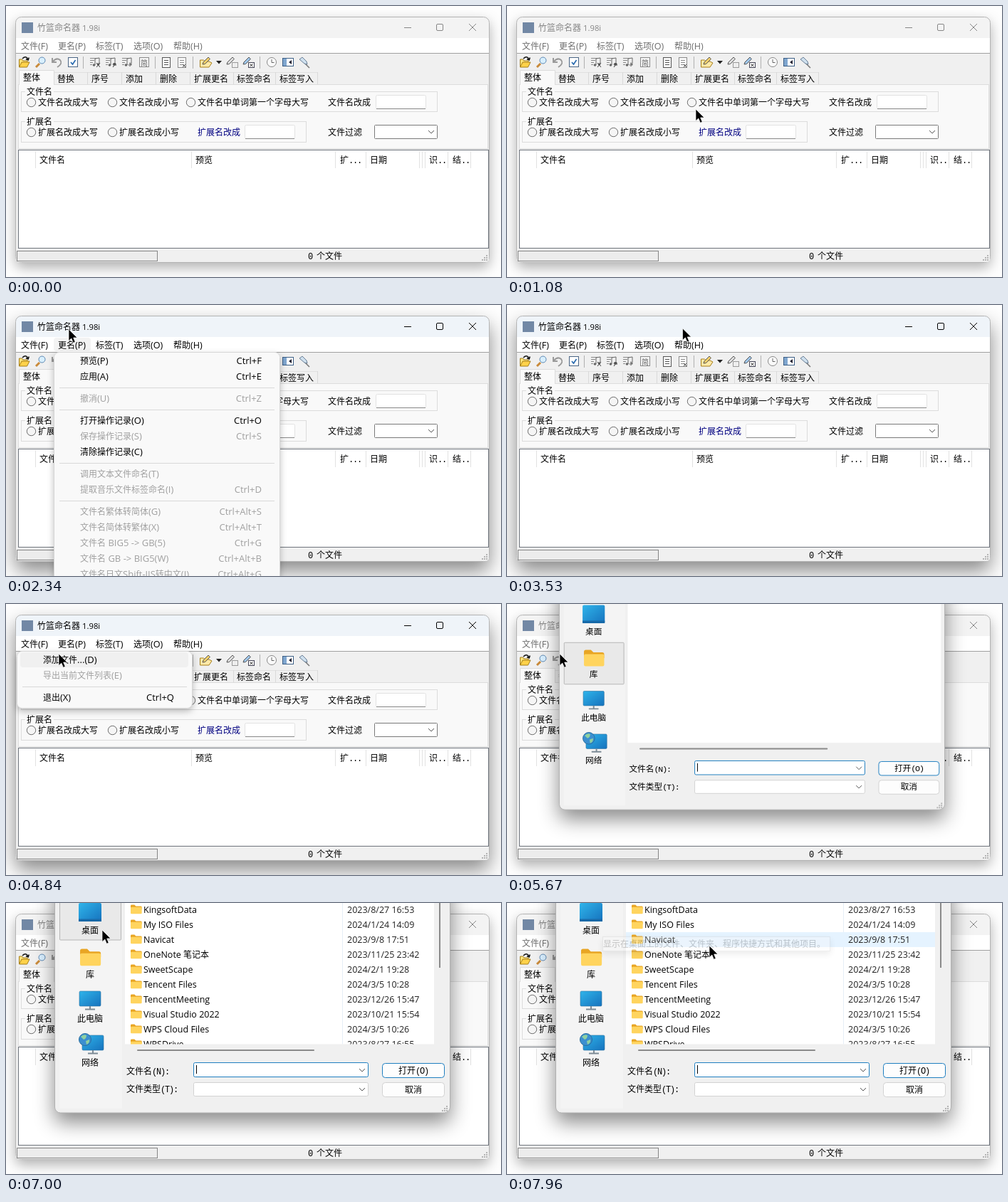
Recreate the animation shown at these times as an HTML page. Size 695 by 381 pixels, loop 8000 ms.

```html
<!DOCTYPE html>
<html lang="zh-CN">
<head>
<meta charset="utf-8">
<style>
html, body { margin: 0; width: 100%; height: 100%; overflow: hidden; background: #fefefe; }
svg { display: block; width: 100%; height: 100%; --ink: #868686; --menu: #6e6e6e; --bar: #f3f3f3; }
svg.active { --ink: #000; --bar: #eff4f9; }
svg.awake { --menu: #000; }
text { font: 12px "Open Sans", "Noto Sans CJK SC", "Noto Sans CJK", sans-serif; white-space: pre; }
.m { font-family: "Liberation Mono", "Noto Sans CJK SC", "Noto Sans CJK", monospace; }
.m tspan { letter-spacing: -1.2px; }
.frame { filter: drop-shadow(0 7px 9px rgba(0,0,0,.3)); }
.active .frame, #dialog .shell { filter: drop-shadow(0 13px 14px rgba(0,0,0,.46)); }
.pop { filter: drop-shadow(0 4px 5px rgba(0,0,0,.25)); }
</style>
</head>
<body>
<svg id="stage" viewBox="0 0 695 381" preserveAspectRatio="none"></svg>
<script>
const LOOP = 8000;
const stage = document.getElementById('stage');
const $ = id => document.getElementById(id);

// Drawing helpers: text is centred on y, Latin runs get their own size
const T = (x, y, s, o = '', latin = 12.6) =>
  `<text x="${x}" y="${y + 4.5}" ${o}>` +
  s.replace(/[ -~]+/g, m => `<tspan font-size="${latin}">${m}</tspan>`) + '</text>';
const M = (x, y, s, o = '') => T(x, y, s, 'class="m" ' + o, 12);
const R = (x, y, w, h, fill, o = '') =>
  `<rect x="${x}" y="${y}" width="${w}" height="${h}" fill="${fill}" ${o}></rect>`;
const B = (x, y, w, h, fill, line, r = 0, o = '') =>
  R(x + .5, y + .5, w - 1, h - 1, fill, `stroke="${line}" rx="${r}" ${o}`);
const P = (d, line, fill = 'none', o = '') => `<path d="${d}" stroke="${line}" fill="${fill}" ${o}></path>`;
const C = (x, y, r, fill, line = 'none') => `<circle cx="${x}" cy="${y}" r="${r}" fill="${fill}" stroke="${line}"></circle>`;
const G = (id, s) => `<g id="${id}">${s}</g>`;
const V = (xs, y, h, c) => xs.map(x => R(x, y, 1, h, c)).join('');
const each = (list, f) => list.map(f).join('');
const chevron = (x, y) => P(`M${x - 4} ${y - 2}l4 4 4 -4`, '#555');
const grip = (x, y) => each([[0, 0], [-3, 0], [-6, 0], [0, -3], [-3, -3], [0, -6]],
  ([a, b]) => R(x + a, y + b, 2, 2, '#b4b4b4'));
const folder = (x, y, k) => `<g transform="translate(${x} ${y}) scale(${k})">` +
  P('M0 1.5q0 -1.5 1.5 -1.5h4l2 2h7q1.5 0 1.5 1.5v3h-16z', 'none', '#e8a524') +
  R(0, 3.4, 16, 9.6, '#ffd45e', 'rx="1.2"') + '</g>';
const monitor = (x, y) => R(x, y, 30, 21, 'url(#blue)', 'rx="1.5" stroke="#2b6f9e" stroke-width=".6"') +
  P(`M${x + 15} ${y + 21}v4M${x + 8} ${y + 25.5}h14`, '#7d8b96', 'none', 'stroke-width="2"');

function toolbar() {
  const dim = '#9a9a9a';
  const sheet = (x, c) => B(x - 6, 72, 12, 15, '#fafafa', c) +
    P(`M${x - 3} 76.5h6m-6 3h6m-6 3h6`, c);
  const notes = x => P(`M${x - 7} 73.5h9m-9 3h6m-6 3h4m-4 3h3`, '#888') +
    P(`M${x} 83v-9l6 -1v8`, '#666') + C(x - 1.5, 83, 1.8, '#666') + C(x + 4.5, 82, 1.8, '#666');
  const pencil = (x, c) => P(`M${x - 5} 82l1 -3 7 -7 2.5 2.5 -7 7z`, '#555', c);
  return V([108, 209, 262, 356], 71, 17, '#b0b0b0') +
    P('M18.5 86v-11h4l1.5 2h6v3', '#a57e18', '#ffe37a') + P('M18.5 86l3.5 -7h11l-3.5 7z', '#a57e18', '#ffd24a') +
    P('M23 74q5 -5 8 1m-3 -.5l3.2 1.5 1 -3.5', '#111', 'none', 'stroke-width="1.5"') +
    P('M47 81l-5 5', '#c98a3a', 'none', 'stroke-width="3"') + C(50.5, 76.5, 4.5, '#d8efff', '#5b86b0') +
    P('M65 73v6h6M66 78q5 -6 10 -2q4 5 -4 10', dim, 'none', 'stroke-width="2"') +
    B(87, 72, 14, 14, '#fff', '#4a6584') + P('M91 79l2.5 3 4 -6', '#2b6cb0', 'none', 'stroke-width="1.7"') +
    each([125, 147, 170], notes) +
    P('M127 80l5 6m0 -6l-5 6', '#444') + P('M150 86l4 -5m-3 0h3v3', '#333') + P('M174 79v6m-3 -3l3 3 3 -3', dim) +
    B(187, 72, 14, 14, '#f4f4f4', '#8a8a8a') + T(189, 79, '简', 'style="font-size:10px" fill="#666"') +
    sheet(225, '#555') + sheet(247, '#8a8a8a') + P('M248 86l4 -4m0 4l-4 -4', '#555') +
    P('M272.5 86v-10h5l1.5 2h6l4 2 -4 6z', '#a57e18', '#ffe9a8') + pencil(281, '#f5cf6a') +
    P('M295 77h8l-4 4.5z', 'none', '#222') +
    pencil(315, '#ddd') + B(317, 79, 9, 8, '#eee', dim) + pencil(338, '#9fc6ec') +
    B(340, 79, 9, 8, '#fff', '#445') + P('M342.5 81.5l4 3.5m0 -3.5l-4 3.5', '#222') +
    C(373, 79, 6.5, '#fafafa', '#888') + P('M373 75v4.5h3.5', '#666') +
    B(388, 73, 16, 12, '#fff', '#3d5f86') + R(389, 74, 5, 10, '#7fa6cf') + P('M401 76v6l-4 -3z', 'none', '#223') +
    P('M419 80l7 7', '#777', 'none', 'stroke-width="1.5"') + P('M412 75l4 -3 6 6 1 4 -4 -1z', '#6a7f96', '#cfe0ee');
}

function mainWindow() {
  const radio = (x, y, s) => C(x, y, 6.2, '#f5f5f5', '#6c6c6c') + M(x + 9.5, y, s);
  const input = (x, y) => B(x, y, 71, 20, '#fff', '#e2e2e2', 2) + R(x + 1, y + 19, 69, 1, '#8a8a8a');
  const group = (y, w, h, s) => B(21, y, w, h, 'none', '#dcdcdc') + R(27, y - 4, 40, 9, '#f9f9f9') + M(29, y + .7, s);
  const ink = 'fill="var(--ink)"', menuInk = 'fill="var(--menu)"';
  return R(13.5, 15.5, 665, 345, 'var(--bar)', 'rx="8" stroke="#b4b4b4" class="frame"') +
    R(22, 23, 16, 15, '#7288a5') + T(44, 30, '竹篮命名器 1.98i', ink, 11.3) +
    P('M559 30.5h10M606 25.5h6q1.5 0 1.5 1.5v6q0 1.5 -1.5 1.5h-6q-1.5 0 -1.5 -1.5v-6q0 -1.5 1.5 -1.5M650 25l10 10m0 -10l-10 10', 'var(--ink)') +
    R(14, 45, 664, 21, '#fff') + G('spot', R(67, 46, 52, 19, '#f3f3f3', 'rx="4"')) +
    each([[21, '文件(F)'], [73, '更名(P)'], [126, '标签(T)'], [179, '选项(O)'], [235, '帮助(H)']],
      ([x, s]) => T(x, 56, s, menuInk)) +
    R(14, 66, 664, 287, '#f0f0f0') + R(14, 352, 664, 8, '#f0f0f0', 'rx="5"') + R(14, 66, 664, 1, '#a0a0a0') +
    toolbar() +
    B(17, 110, 660, 91, '#f9f9f9', '#dcdcdc') + R(67, 93, 371, 1, '#e0e0e0') +
    V([114, 162, 210, 258, 319, 378, 437], 93, 17, '#d9d9d9') +
    P('M18.5 111v-20.5h49v20.5', '#dcdcdc', '#f9f9f9') + M(24, 100, '整体') +
    each([[72, '替换'], [120, '序号'], [168, '添加'], [216, '删除'], [264, '扩展更名'], [324, '标签命名'], [384, '标签写入']],
      ([x, s]) => M(x, 102, s)) +
    group(120, 585, 29, '文件名') + group(162, 401, 30, '扩展名') +
    radio(35.5, 135.5, '文件名改成大写') + radio(149.5, 135.5, '文件名改成小写') +
    radio(259.5, 135.5, '文件名中单词第一个字母大写') +
    radio(35.5, 177.5, '扩展名改成大写') + radio(149.5, 177.5, '扩展名改成小写') +
    M(452, 135, '文件名改成') + input(519, 125) +
    M(269, 177, '扩展名改成', 'fill="#000080"') + input(335, 167) +
    M(452, 177, '文件过滤') + B(517, 167, 89, 20, '#fff', '#7a7a7a', 1) + chevron(597, 177) +
    B(17, 202, 661, 139, '#fff', '#6e747c') + V([41, 260, 462, 505, 580, 584, 588, 620, 652], 204, 24, '#e2e2e2') +
    each([[47, '文件名'], [266, '预览'], [469, '扩...'], [511, '日期'], [594, '识..'], [627, '结..']],
      ([x, s]) => M(x, 216, s)) +
    B(15, 344, 198, 15, '#ececec', '#858585') + M(424, 351, '0 个文件') + grip(674, 356);
}

// Items are [label, shortcut, disabled]; null is a separator
function menu(id, x, w, h, tx, right, items, under = '') {
  let y = 78, s = R(x + .5, 66.5, w, h, '#f9f9f9', 'rx="7" stroke="#d6d6d6" class="pop"') + under;
  for (const it of items) {
    if (!it) { s += R(x + 8, y - 6, w - 15, 1, '#d9d9d9'); y += 9; continue; }
    const fill = `fill="${it[2] ? '#a0a0a0' : '#000'}"`;
    s += T(tx, y, it[0], fill, 13) + T(right, y, it[1], fill + ' text-anchor="end"', 13);
    y += 22;
  }
  return G(id, s);
}

const files = [['KingsoftData', '2023/8/27 16:53'], ['My ISO Files', '2024/1/24 14:09'], ['Navicat', '2023/9/8 17:51'],
  ['OneNote 笔记本', '2023/11/25 23:42'], ['SweetScape', '2024/2/1 19:28'], ['Tencent Files', '2024/3/5 10:28'],
  ['TencentMeeting', '2023/12/26 15:47'], ['Visual Studio 2022', '2023/10/21 15:54'],
  ['WPS Cloud Files', '2024/3/5 10:26'], ['WPSDrive', '2023/8/27 16:55']];

function dialog() {
  const mid = 'text-anchor="middle"', accent = '#1f7fc0';
  return R(68.5, -60, 555, 355, '#f0f0f0', 'rx="8" stroke="#b0b0b0" class="shell"') +
    R(75, -10, 88, 299, '#f4f4f4') +
    R(75.5, 54, 86, 60, '#e9e9e9', 'id="place" stroke="#b5b5b5" rx="1"') +
    R(102, 0, 32, 26, 'url(#blue)', 'rx="2"') + R(102, 22.5, 32, 3.5, '#1769a8') +
    folder(104, 64.5, 1.82) + monitor(103, 124) + monitor(107, 186) +
    C(111, 192, 8.5, '#3b8fd0', '#2b6f9e') + P('M105 188q4 -4 8 -2q0 5 -4 6zM112 194l5 -2q1 5 -4 7z', 'none', '#8fd0a0') +
    each(['桌面', '库', '此电脑', '网络'], (s, i) => M(118, 38 + 62 * i, s, mid)) +
    R(167, -10, 451, 208.5, '#fff', 'id="pane"') +
    `<g id="list" clip-path="url(#rows)">` + R(472, -5, 1, 204, '#e6eef6') + R(167, 0, 434, 21, '#e5f3ff', 'id="row"') +
    each(files, ([name, date], i) => folder(175, 2.5 + 21 * i, .98) +
      T(193, 9 + 21 * i, name, 'fill="#000"', 12.5) + T(479, 9 + 21 * i, date, 'fill="#222"', 12.5)) + '</g>' +
    R(608, -5, 2, 96, '#8a8a8a', 'id="vbar"') + R(184, 206, 271, 2, '#8a8a8a', 'id="hbar" rx="1"') +
    M(169, 236, '文件名(N):') + M(169, 261.5, '文件类型(T):') +
    B(263, 224, 246, 21, '#fff', accent, 2) + B(263, 252, 246, 20, '#fff', '#d2d2d2', 2) +
    chevron(500, 235) + chevron(500, 262) + R(267, 228, 1, 12, '#000', 'id="caret"') +
    B(528, 225, 88, 21, '#fdfdfd', accent, 4) + B(528, 252, 88, 21, '#fdfdfd', '#d2d2d2', 4) +
    M(572, 235, '打开(O)', mid) + M(572, 262, '取消', mid) + grip(618, 291);
}

stage.innerHTML = `<defs><linearGradient id="blue" x2="1" y2="1"><stop stop-color="#2fb4ea"/><stop offset="1" stop-color="#1672bd"/></linearGradient>
<clipPath id="rows"><rect x="167" y="-5" width="434" height="203.5"/></clipPath></defs>` +
  mainWindow() +
  menu('rename', 67, 317, 330, 104, 359, [['预览(P)', 'Ctrl+F'], ['应用(A)', 'Ctrl+E'], null,
    ['撤消(U)', 'Ctrl+Z', 1], null, ['打开操作记录(O)', 'Ctrl+O'], ['保存操作记录(S)', 'Ctrl+S', 1], ['清除操作记录(C)', ''], null,
    ['调用文本文件命名(T)', '', 1], ['提取音乐文件标签命名(I)', 'Ctrl+D', 1], null,
    ['文件名繁体转简体(G)', 'Ctrl+Alt+S', 1], ['文件名简体转繁体(X)', 'Ctrl+Alt+T', 1], ['文件名 BIG5 -> GB(5)', 'Ctrl+G', 1],
    ['文件名 GB -> BIG5(W)', 'Ctrl+Alt+B', 1], ['文件名日文Shift-JIS转中文(J)', 'Ctrl+Alt+G', 1]]) +
  menu('file', 15, 246, 80, 52, 236, [['添加文件...(D)', ''], ['导出当前文件列表(E)', '', 1], null, ['退出(X)', 'Ctrl+Q']],
    R(20, 68, 236, 21, '#f0f0f0', 'id="fileHover" rx="4"')) +
  G('dialog', dialog()) +
  G('tip', R(134.5, 47.5, 319, 20, '#f9f9f9', 'stroke="#c8c8c8" class="pop"') +
    M(135, 57, '显示在桌面上的文件、文件夹、程序快捷方式和其他项目。', 'fill="#555"')) +
  G('cursor', P('M0 0V16.5L3.8 13 6.4 19.2 9.2 18 6.7 12H12Z', '#fff', '#000', 'stroke-width=".7"'));

const bursts = [0, 390, 1220, 2060, 2960, 3800, 4420, 5040, 5880, 6710, 7470];

// Pointer waypoints: time, x, y
const track = [[390, 631, 368], [700, 420, 252], [1020, 265, 145], [1150, 264, 133], [1990, 90, 47], [2060, 89, 44],
  [2340, 88, 34], [2500, 100, 30], [2830, 157, 11], [2960, 157, 11], [3400, 248, 30], [3730, 244, 38],
  [4000, 130, 76], [4210, 46, 56], [4420, 46, 54], [4760, 74, 70], [5880, 74, 70], [6300, 90, 66],
  [6640, 125, 56], [6990, 135, 38], [7270, 134, 28], [7540, 140, 30], [7960, 284, 60], [8000, 284, 60]];

const clamp = v => Math.max(0, Math.min(1, v));
const fade = (t, from, to, out = 110) => clamp((t - from) / 140) * clamp((to + out - t) / out);
const show = (id, v) => { $(id).style.opacity = +v; };

function pointer(t) {
  const i = track.findIndex(k => k[0] > t), a = track[i - 1], b = track[i];
  const p = (t - a[0]) / (b[0] - a[0]);
  return [a[1] + (b[1] - a[1]) * p, a[2] + (b[2] - a[2]) * p];
}

function draw(now) {
  const raw = now % LOOP, start = bursts.findLast(b => b <= raw);
  const t = start + Math.floor((raw - start) / 70) * 70;
  const [x, y] = t < 390 ? [-50, -50] : pointer(t);
  const modal = t >= 5530, loaded = t >= 5880;
  $('cursor').setAttribute('transform', `translate(${x} ${y})`);
  stage.classList.toggle('active', t >= 2060 && !modal);
  stage.classList.toggle('awake', t >= 1900 && !modal);

  show('rename', fade(t, 2010, 2600));
  show('spot', t >= 1950 && t < 2600);
  show('file', fade(t, 4380, 5000));
  show('fileHover', y > 66);

  const p = clamp((t - 5530) / 280), k = .9 + .1 * (1 - (1 - p) ** 2);
  $('dialog').setAttribute('transform', `translate(266 64) scale(${k}) translate(-266 -64)`);
  show('dialog', clamp(p * 2));
  show('list', loaded);
  show('vbar', loaded);
  $('pane').setAttribute('width', loaded ? 434 : 451);
  $('hbar').setAttribute('width', loaded ? 249 : 271);
  show('caret', (t - 5600 + 1060 * 9) % 1060 < 530);

  const over = x > 76 && x < 162;
  $('place').setAttribute('y', loaded ? Math.floor((y + 8) / 62) * 62 - 8 : 54);
  show('place', !loaded || over);
  $('row').setAttribute('y', Math.round((y - 9) / 21) * 21 - 1);
  show('row', x > 167);
  show('tip', t >= 7470 && fade(t, 7400, 7820, 200));
}

(function tick() {
  draw(performance.now());
  requestAnimationFrame(tick);
})();
</script>
</body>
</html>
```
